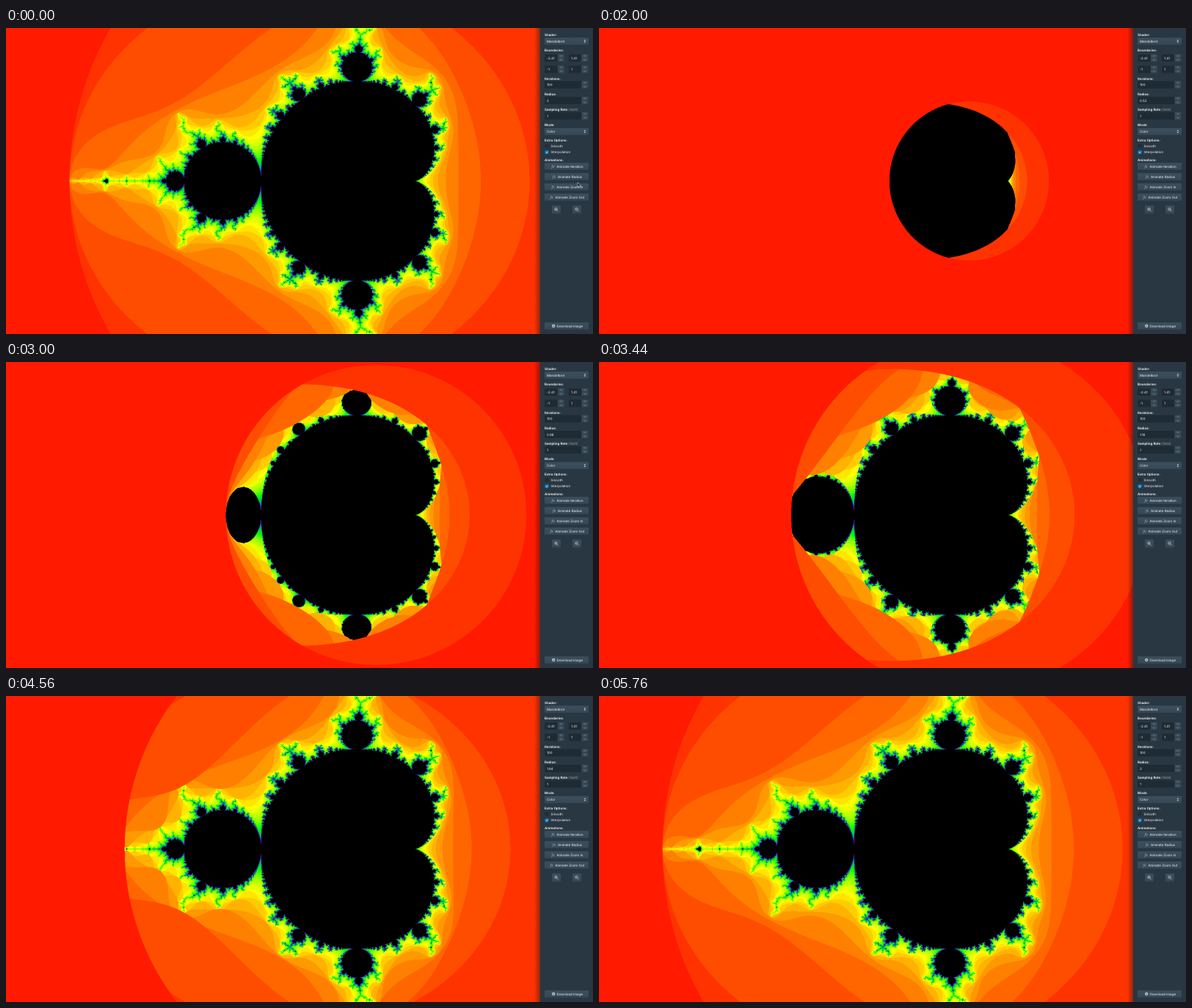
Recreate the animation shown at these times as an HTML page with a canvas. Size 800x418 px, loop 5.8 s.

```html
<!DOCTYPE html>
<html lang="en">
<head>
<meta charset="utf-8">
<title>Mandelbrot escape radius</title>
<style>
  html, body { margin: 0; width: 100%; height: 100%; overflow: hidden; background: #ff1a00; }
  canvas, svg { position: absolute; left: 0; top: 0; display: block; }
  canvas { width: 728px; height: 418px; }
  text { font: 4.5px Inter, "Open Sans", sans-serif; fill: #f5f8fa; text-rendering: geometricPrecision; }
  .label { font-weight: 600; }
  .muted { fill: #8a9ba8; }
  .fx { font: italic 5px "Noto Serif", serif; fill: #a7b6c2; }
</style>
</head>
<body>
<canvas id="fractal" width="1456" height="836"></canvas>
<svg id="ui" width="800" height="418" viewBox="0 0 800 418">
  <defs>
    <linearGradient id="shade">
      <stop offset="0" stop-color="#10161a" stop-opacity="0"/>
      <stop offset="1" stop-color="#10161a" stop-opacity=".45"/>
    </linearGradient>
    <linearGradient id="raised" x2="0" y2="1">
      <stop offset="0" stop-color="#3d4f5d"/>
      <stop offset="1" stop-color="#364855"/>
    </linearGradient>
  </defs>
  <rect x="720" width="8" height="418" fill="url(#shade)"/>
  <rect x="728" width="72" height="418" fill="#293742"/>
  <g id="panel"></g>
  <path id="pointer" d="M0 0V6.2L1.5 4.9L2.5 7.1L3.5 6.7L2.5 4.5H4.5Z" fill="#111" stroke="#fff" stroke-width=".5"/>
</svg>
<script>
const LOOP = 5800, STEP = 40, MAX_ITER = 100, LEVELS = 100;
const RESET_AT = 800, POINTER_GONE = 1000;

// [time, radius] pairs; growth slows a little as the picture gets heavier
const RADIUS_KEYS = [[RESET_AT, 0], [1320, .22], [1800, .42], [2400, .7], [2560, .78], [3000, .98],
  [3440, 1.16], [3600, 1.24], [3880, 1.36], [4200, 1.5], [4560, 1.64], [4800, 1.74], [5400, 1.98], [5480, 2]];
const COLOR_STOPS = [[0, 255, 0, 0], [10, 255, 255, 0], [22, 0, 255, 0],
  [48, 0, 60, 255], [78, 160, 0, 200], [100, 255, 0, 0]];

function interpolate(keys, x, col) {
  if (x <= keys[0][0]) return keys[0][col];
  const i = keys.findIndex(k => k[0] >= x);
  if (i < 0) return keys[keys.length - 1][col];
  const a = keys[i - 1], b = keys[i];
  return a[col] + (b[col] - a[col]) * (x - a[0]) / (b[0] - a[0]);
}

// ---- Fractal: escape counts for every radius level, upper half only ----
const canvas = document.getElementById('fractal');
const ctx = canvas.getContext('2d');
const W = canvas.width, H = canvas.height, HALF = H / 2;
const image = ctx.createImageData(W, H);
const pixels = new Uint32Array(image.data.buffer);
const palette = new Uint32Array(MAX_ITER + 1);
palette[0] = 0xff000000;
for (let n = 1; n <= MAX_ITER; n++) {
  const [r, g, b] = [1, 2, 3].map(c => Math.round(interpolate(COLOR_STOPS, n, c)));
  palette[n] = (255 << 24 | b << 16 | g << 8 | r) >>> 0;
}
const limits = Float64Array.from({ length: LEVELS + 1 }, (_, k) => (k * 2 / LEVELS) ** 2);
const counts = Array.from(limits, () => new Uint8Array(W * HALF));

function computeRow(row) {
  const cy = 1 - (row + .5) / HALF;
  for (let col = 0; col < W; col++) {
    const cx = ((col + .5) / 2 - 400) / 209 - .5;
    const at = row * W + col;
    let x = 0, y = 0, x2 = 0, y2 = 0, level = 0;
    for (let n = 1; n < MAX_ITER && level <= LEVELS; n++) {
      y = 2 * x * y + cy;
      x = x2 - y2 + cx;
      x2 = x * x;
      y2 = y * y;
      const size = x2 + y2;
      while (level <= LEVELS && size > limits[level]) counts[level++][at] = n;
    }
  }
}
for (let row = 0; row < HALF; row++) computeRow(row);

function paintFractal(level) {
  const source = counts[level];
  for (let row = 0, at = 0; row < HALF; row++) {
    let mirror = (H - 1 - row) * W;
    for (let col = 0; col < W; col++, at++) pixels[at] = pixels[mirror++] = palette[source[at]];
  }
  ctx.putImageData(image, 0, 0);
}

// ---- Control panel ----
const panel = document.getElementById('panel');

function add(tag, attrs, content) {
  const el = document.createElementNS('http://www.w3.org/2000/svg', tag);
  for (const key in attrs) el.setAttribute(key, attrs[key]);
  if (content !== undefined) el.textContent = content;
  return panel.appendChild(el);
}
const write = (x, y, str, cls = '') => add('text', { x, y: y + 1.6, class: cls }, str);
const box = (x, y, width, height, fill) => add('rect', { x, y: y - height / 2, width, height, rx: 1, fill });
const stroke = (d, color = '#a7b6c2', width = .7) =>
  add('path', { d, fill: 'none', stroke: color, 'stroke-width': width });

function select(y, str) {
  box(734, y, 60, 9.6, 'url(#raised)');
  write(737, y, str);
  add('path', { d: `M787.5 ${y - .6}l1.4-1.7l1.4 1.7zM787.5 ${y + .6}l1.4 1.7l1.4-1.7z`, fill: '#bfccd6' });
}
function numberField(x, y, width, str) {
  box(x, y, width, 10, '#1f2b34');
  const sx = x + width + .7, mid = sx + 4.2;
  box(sx, y - 2.6, 8.5, 4.8, 'url(#raised)');
  box(sx, y + 2.6, 8.5, 4.8, 'url(#raised)');
  stroke(`M${mid - 1.3} ${y - 2}l1.3-1.2l1.3 1.2M${mid - 1.3} ${y + 2}l1.3 1.2l1.3-1.2`, '#a7b6c2', .5);
  return write(x + 3, y, str);
}
function button(y, str, iconX) {
  const rect = box(734, y, 60, 9.6, 'url(#raised)');
  write(iconX, y, 'fx', 'fx');
  write(iconX + 7, y, str);
  return rect;
}
function zoomButton(x, plus) {
  const y = 248;
  box(x - 6, y, 12, 11, 'url(#raised)');
  add('circle', { cx: x - .5, cy: y - .5, r: 1.8, fill: 'none', stroke: '#bfccd6', 'stroke-width': .7 });
  stroke(`M${x + .8} ${y + .8}l1.8 1.8M${x - 1.4} ${y - .5}h1.8` + (plus ? `M${x - .5} ${y - 1.4}v1.8` : ''), '#bfccd6');
}

[[9, 'Shader:'], [30, 'Boundaries:'], [69, 'Iterations:'], [90, 'Radius:'], [111, 'Sampling Rate:'],
  [132, 'Mode:'], [153.5, 'Extra Options:'], [180, 'Animations:']].forEach(([y, str]) => write(734, y, str, 'label'));
write(767, 111, '(NaN)', 'muted');
select(18, 'Mandelbrot');
select(141.5, 'Color');
numberField(734, 41, 17.5, '-2.41');
numberField(767, 41, 17, '1.41');
numberField(734, 56.5, 17.5, '-1');
numberField(767, 56.5, 17, '1');
numberField(734, 77.5, 50, '100');
const radiusText = numberField(734, 99, 50, '2');
numberField(734, 120, 50, '1');

box(734.5, 161, 5, 5, '#202d36');
write(742.5, 161, 'Smooth');
box(734.5, 169.7, 5, 5, '#137cbd');
stroke('M735.8 169.8l1 1l1.7-2.1', '#fff');
write(742.5, 169.7, 'Interpolation');

button(189, 'Animate Iteration', 743.5);
const radiusButton = button(203, 'Animate Radius', 745);
button(217, 'Animate Zoom In', 743.5);
button(231, 'Animate Zoom Out', 741.5);
zoomButton(750, true);
zoomButton(778, false);
box(734, 407, 60, 9.6, 'url(#raised)');
add('circle', { cx: 746.2, cy: 407, r: 2.2, fill: '#bfccd6' });
stroke('M746.2 405.6v2.4M745.2 407.2l1 1l1-1', '#364855', .6);
write(750.5, 407, 'Download image');

// ---- Animation ----
const pointer = document.getElementById('pointer');
let shownLevel = -1;

function render(time) {
  const t = Math.floor(time % LOOP / STEP) * STEP;
  const radius = t < RESET_AT ? 2 : interpolate(RADIUS_KEYS, t, 1);
  const level = Math.round(radius * LEVELS / 2);
  if (level !== shownLevel) {
    paintFractal(level);
    radiusText.textContent = String(level * 2 / LEVELS);
    shownLevel = level;
  }
  const p = Math.min(1, t / 400), ease = p * p * (3 - 2 * p);
  pointer.setAttribute('transform', `translate(${779 - 6 * ease} ${211 - 8 * ease})`);
  pointer.setAttribute('visibility', t < POINTER_GONE ? 'visible' : 'hidden');
  radiusButton.setAttribute('fill', t >= 200 && t < POINTER_GONE ? '#30404d' : 'url(#raised)');
}

const start = performance.now();
function tick() {
  render(performance.now() - start);
  requestAnimationFrame(tick);
}
tick();
</script>
</body>
</html>
```
